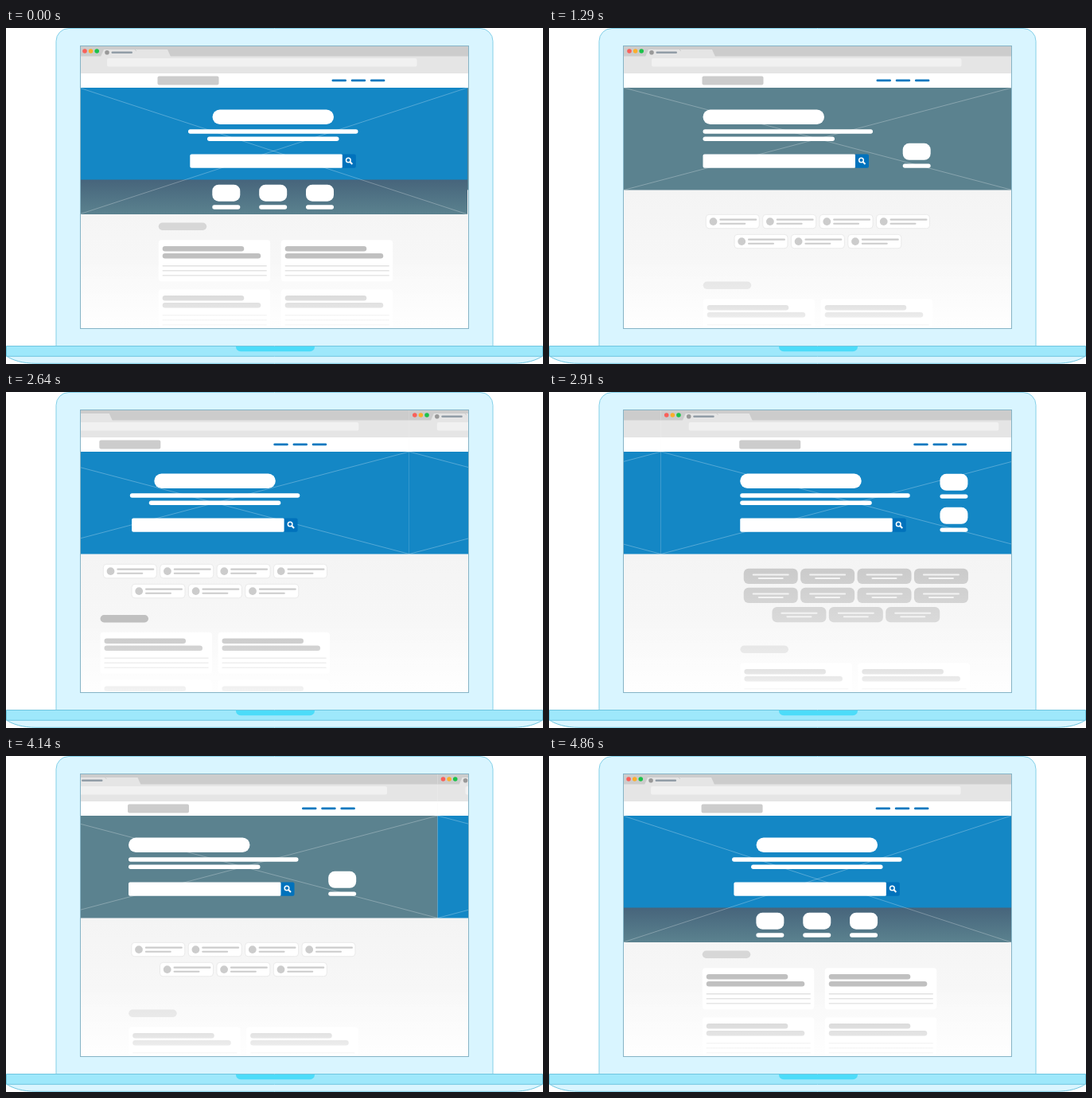
An HTML page with a canvas for the animation above (4.92 s loop, 675x422 px).

```html
<!DOCTYPE html>
<html lang="en">
<head>
<meta charset="utf-8">
<title>Laptop carousel</title>
<style>
html, body { margin: 0; width: 100%; height: 100%; overflow: hidden; background: #fff; }
canvas { display: block; }
</style>
</head>
<body>
<canvas id="stage" width="675" height="422"></canvas>
<script>
const ctx = document.getElementById('stage').getContext('2d');
const LOOP = 4920, STEP = 30, SLIDE = 488, LEFT = 94;
const BLUE = '#1487c5', TEAL = '#5b828f', LINK = '#0a78bf';

// start ms, duration ms, target scroll
const moves = [
  [630, 668, SLIDE], [1620, 676, 2 * SLIDE], [2610, 553, 3 * SLIDE],
  [3398, 356, 2 * SLIDE], [3938, 356, SLIDE], [4478, 436, 0]
];

function scrollAt(t) {
  let pos = 2;
  for (const [start, duration, target] of moves) {
    const u = Math.min(1, Math.max(0, (t - start) / duration));
    pos += (target - pos) * (1 - (1 - u) ** 3);
  }
  return pos;
}

function box(x, y, w, h, r, fill, stroke) {
  ctx.beginPath();
  ctx.roundRect(x, y, w, h, r);
  ctx.fillStyle = fill;
  ctx.fill();
  if (stroke) {
    ctx.strokeStyle = stroke;
    ctx.lineWidth = 1;
    ctx.stroke();
  }
}

const pill = (x, y, w, h, fill = '#fff') => box(x, y, w, h, h / 2, fill);

function dot(x, y, r, fill) {
  ctx.beginPath();
  ctx.arc(x, y, r, 0, 7);
  ctx.fillStyle = fill;
  ctx.fill();
}

function line(points, color, width) {
  ctx.beginPath();
  points.forEach(([x, y]) => ctx.lineTo(x, y));
  ctx.strokeStyle = color;
  ctx.lineWidth = width;
  ctx.stroke();
}

function fade(y0, y1, from, to) {
  const g = ctx.createLinearGradient(0, y0, 0, y1);
  g.addColorStop(0, from);
  g.addColorStop(1, to);
  return g;
}

function browserBar() {
  box(0, 23, SLIDE, 13, 0, '#ccc');
  box(0, 35.5, SLIDE, 21.5, 0, '#e5e5e5');
  ['#f9605a', '#fbae2c', '#1cc24a'].forEach((c, i) => dot(7 + i * 7.6, 29, 2.8, c));
  ctx.beginPath();
  ctx.moveTo(27, 36);
  ctx.lineTo(31, 27);
  ctx.lineTo(111, 27);
  ctx.lineTo(115, 36);
  ctx.fillStyle = '#e5e5e5';
  ctx.fill();
  line([[70, 27], [72, 29]], '#ccc', 1);
  dot(35, 30.8, 2.8, '#999');
  pill(40.5, 29.5, 26.5, 2.4, '#929da7');
  box(35, 38, 389.5, 10.5, 2, '#f1f1f1');
  box(0, 57, SLIDE, 18.5, 0, '#fff');
  box(98.5, 60.5, 77, 11, 2, '#ccc');
  for (let i = 0; i < 3; i++) pill(317.5 + i * 24.2, 64.5, 18.5, 2.8, LINK);
}

function hero(color, bottom, centered) {
  box(0, 75, SLIDE, bottom - 75, 0, color);
  if (bottom > 204) box(0, 190.5, SLIDE, bottom - 190.5, 0, fade(190, bottom, '#46647b', TEAL));
  const faint = 'rgba(255,255,255,.27)';
  line([[0, 75], [SLIDE, bottom]], faint, 1);
  line([[0, bottom], [SLIDE, 75]], faint, 1);
  const at = x => centered ? x : 99.5;
  pill(at(167.5), 102.5, 152.5, 18.5);
  pill(at(137), 127.3, 213.5, 5.4);
  pill(at(161), 136.6, 165.5, 5.4);
  const x = at(139.3);
  box(x, 158.5, 192, 17.3, 2, '#fff');
  box(x + 191.5, 158.5, 17, 17.3, [0, 2, 2, 0], '#0072bc');
  ctx.beginPath();
  ctx.arc(x + 199, 166, 2.8, 0, 7);
  ctx.strokeStyle = '#fff';
  ctx.lineWidth = 1.5;
  ctx.stroke();
  line([[x + 201, 168], [x + 204, 171]], '#fff', 2);
}

function badge(x, y) {
  box(x, y, 35, 21, 8, '#fff');
  pill(x, y + 25.6, 35, 5.4);
}

function article(x, y) {
  box(x, y, 140.5, 52, 4, '#fff');
  pill(x + 5, y + 7.7, 102.5, 6.5, '#c0c0c0');
  pill(x + 5, y + 16.7, 123.5, 6.5, '#c0c0c0');
  for (let i = 0; i < 3; i++) box(x + 5, y + 31.7 + i * 6, 131, 1.6, 0, '#e0e0e0');
}

function articles(headY, color, gap, rowGap) {
  pill(99.7, headY, 60.5, 9.5, color);
  for (let row = 0; row < 2; row++)
    for (let col = 0; col < 2; col++)
      article(99.7 + col * gap, headY + 21.8 + row * rowGap);
}

function row(count, x, y, draw) {
  for (let i = 0; i < count; i++) draw(x + i * 71.4, y);
}

function contact(x, y) {
  box(x, y, 67, 17.5, 4, '#fff', '#eaeaea');
  dot(x + 9.2, y + 8.8, 4.9, '#ccc');
  pill(x + 17, y + 5.3, 47, 2.1, '#ccc');
  pill(x + 17, y + 10.4, 33, 2.1, '#ccc');
}

function button(x, y) {
  box(x, y, 68, 19.3, 6, fade(220, 290, '#cacaca', '#dadada'));
  pill(x + 11, y + 6.8, 46, 2, '#f3f3f3');
  pill(x + 18, y + 11.2, 32, 2, '#f3f3f3');
}

const slides = [
  () => {
    hero(BLUE, 234, true);
    [167.3, 226.2, 285].forEach(x => badge(x, 196.7));
    articles(244.5, '#d7d7d7', 154, 62);
  },
  () => {
    hero(TEAL, 203.5, false);
    badge(350.7, 144.8);
    row(4, 103.3, 234.3, contact);
    row(3, 139, 259.3, contact);
    articles(318.5, '#dedede', 148, 60);
  },
  () => {
    hero(BLUE, 203.5, true);
    row(4, 103.5, 216.3, contact);
    row(3, 139.2, 241.3, contact);
    articles(280, '#c0c0c0', 148, 60);
  },
  () => {
    hero(BLUE, 203.5, false);
    badge(350.7, 102.8);
    badge(350.7, 144.8);
    row(4, 104, 221.7, button);
    row(4, 104, 245.8, button);
    row(3, 139.7, 270, button);
    articles(318.5, '#dedede', 148, 60);
  }
];

function laptop() {
  box(63, .5, 549, 400, [16, 16, 0, 0], '#d9f5ff', '#83cfe7');
  ctx.beginPath();
  ctx.moveTo(.5, 412);
  ctx.bezierCurveTo(8, 417, 20, 421.3, 38, 421.3);
  ctx.lineTo(637, 421.3);
  ctx.bezierCurveTo(655, 421.3, 667, 417, 674.5, 412);
  ctx.fillStyle = '#d9f5ff';
  ctx.fill();
  ctx.strokeStyle = '#70c6e0';
  ctx.lineWidth = 1;
  ctx.stroke();
  box(.5, 399.5, 674, 12.8, 0, '#9ee8fb', '#70c6e0');
  box(289, 400, 99, 6.2, [0, 0, 6, 6], '#4cdcf9');
}

function draw(t) {
  ctx.clearRect(0, 0, 675, 422);
  laptop();
  ctx.save();
  ctx.beginPath();
  ctx.rect(93.5, 22.5, 488, 355);
  ctx.clip();
  box(93, 22, 489, 356, 0, fade(204, 377, '#f4f4f4', '#fafafa'));
  const scroll = scrollAt(t);
  slides.forEach((content, i) => {
    const x = LEFT + i * SLIDE - scroll;
    if (Math.abs(x - LEFT) >= SLIDE) return;
    ctx.save();
    ctx.translate(x, 0);
    browserBar();
    content();
    ctx.restore();
  });
  box(93, 290, 489, 88, 0, fade(290, 395, 'rgba(255,255,255,0)', '#fff'));
  ctx.restore();
  ctx.strokeStyle = '#86b4c6';
  ctx.lineWidth = 1;
  ctx.strokeRect(93.5, 22.5, 488, 355);
}

function frame() {
  const t = performance.now() % LOOP;
  draw(Math.floor(t / STEP) * STEP);
  requestAnimationFrame(frame);
}
frame();
</script>
</body>
</html>
```
